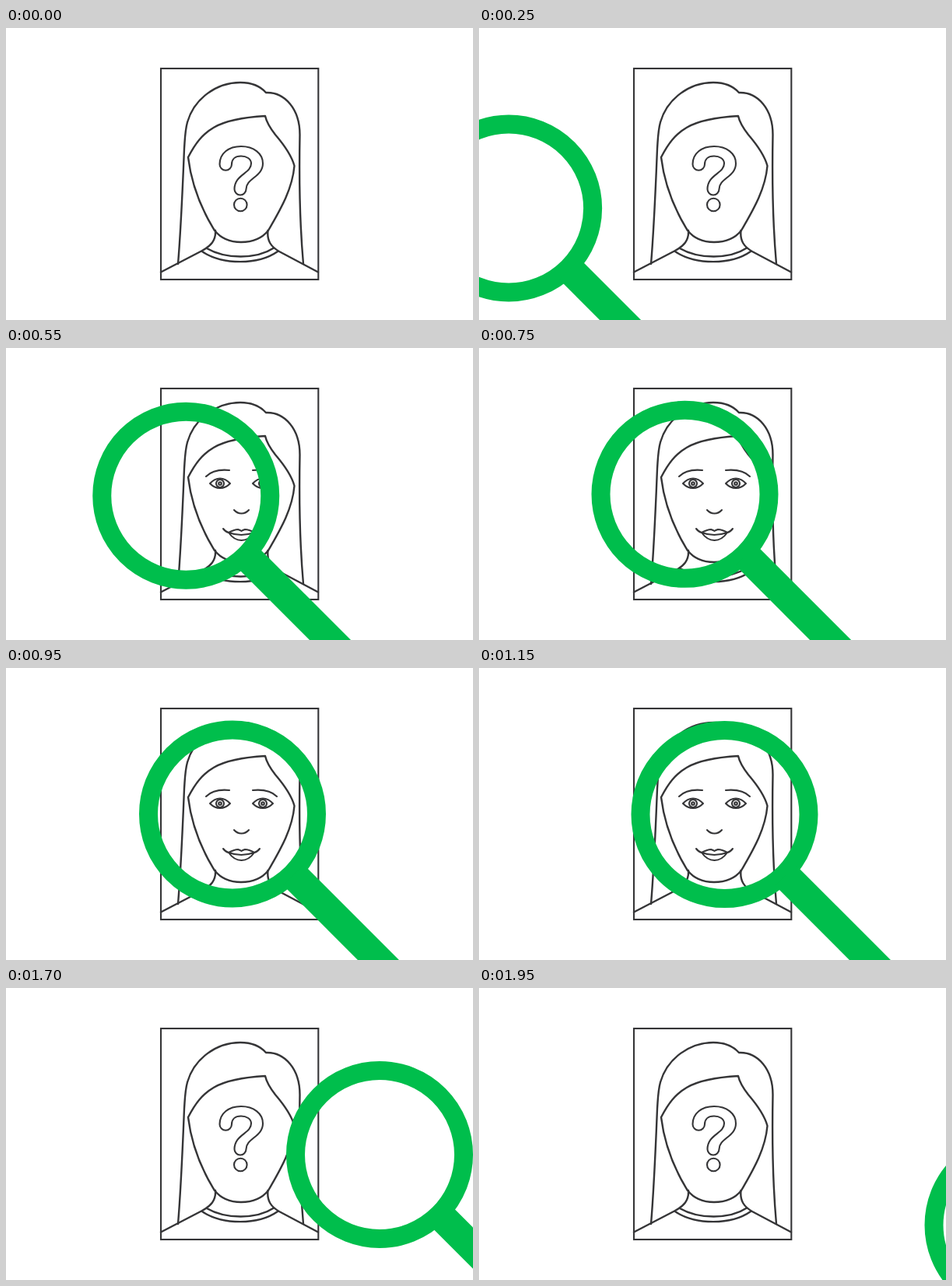
Write an HTML page that moves like this. It is 600 px wide and 375 px high and loops after 2 s.

```html
<!DOCTYPE html>
<html lang="en">
<head>
<meta charset="utf-8">
<title>Magnifier over a portrait</title>
<style>
  html, body { margin: 0; width: 100%; height: 100%; overflow: hidden; background: #fff; }
  svg { display: block; width: 600px; height: 375px; }
  .ink { fill: none; stroke: #353537; stroke-width: 2.1; stroke-linejoin: round; stroke-linecap: round; }
  .bold { stroke-width: 2.4; }
  .glass { fill: none; stroke: #00be4c; }
</style>
</head>
<body>
<svg viewBox="0 0 600 375">
  <defs>
    <clipPath id="lens"><circle class="follow" r="98"/></clipPath>
    <g id="eye">
      <path d="M-13 0Q-7 -6.5 0 -6.5T13 0Q7 6 0 6T-13 0Z"/>
      <circle r="5"/>
      <circle r="1.8"/>
    </g>
  </defs>

  <!-- question mark, blanked out where the lens covers it -->
  <g class="ink">
    <path d="M274.500 175C274.500 161 286 152 302 152C318 152 330 161 330 174C330 191 308.500 193 308.500 207A7.500 7.500 0 0 1 293.500 207C293.500 188 315 187 315 174C315 168 309 164.500 302 164.500C294 164.500 290 169 290 175A7.750 7.750 0 0 1 274.500 175Z"/>
    <circle cx="301.300" cy="227" r="8.300"/>
  </g>
  <circle class="follow" r="98" fill="#fff"/>

  <rect class="ink" x="199" y="52" width="202.300" height="271" style="stroke-linejoin: miter"/>
  <g class="ink bold">
    <!-- hair -->
    <path d="M221 303C225 255 227 205 229 155C230 140 230 132 233 121C242 90 271 70 301 70C315 70 327 75 334 83C358 82 377.500 104 377.500 137C376.500 190 377 247 382 303"/>
    <!-- fringe and jaw -->
    <path d="M234 166C252 131 271 116.500 333 113C335 122 339 128 346 137C358 151 367 164 370.500 177C368 206 354 231 337 260C329 270 316 275 302 275C288 275 276 270 268 260C250 231 238 199 234 166Z"/>
    <!-- neck, shoulders, collar -->
    <path d="M269 260C270 273 263 280 251 286.500L199 313.500M336.500 260C335 274 341 281 351 287L401 313.500"/>
    <path d="M258 283C282 297 322 297 344 282.500M252 287C278 304.500 324 304.500 349 287"/>
  </g>

  <g class="ink" clip-path="url(#lens)">
    <use href="#eye" x="275" y="174"/>
    <use href="#eye" x="330" y="174"/>
    <path d="M257 165Q267 155 287 157M348 165Q338 155 317 157"/>
    <path d="M293 208Q297 212.500 302.500 212.500T312 208"/>
    <path d="M279 232Q282 236 286 237Q294 233 298 233Q301 234 302.500 235Q304 234 307 233Q312 233 319 237Q323 236 326 232"/>
    <path d="M286 237Q302 243 319 237Q312 247 302.500 247T286 237"/>
  </g>

  <g id="magnifier" class="glass">
    <circle r="108" stroke-width="24"/>
    <path d="M78 78L500 500" stroke-width="37.500"/>
  </g>
</svg>
<script>
  const LOOP = 2000, STEP = 50, START = 100;

  // time in ms, x of the lens centre, speed in px per ms
  const keys = [
    [100, -92, 0.87],
    [400, 160, 0.76],
    [600, 242, 0.18],
    [750, 264.5, 0.135],
    [950, 291, 0.125],
    [1150, 315.5, 0.125],
    [1400, 351, 0.17],
    [1700, 480, 0.79],
    [1950, 692.5, 0.87]
  ];

  const magnifier = document.getElementById("magnifier");
  const followers = document.querySelectorAll(".follow");

  // cubic Hermite interpolation between neighbouring keys
  function lensX(t) {
    const i = Math.max(1, keys.findIndex(k => k[0] >= t));
    const [t0, x0, v0] = keys[i - 1], [t1, x1, v1] = keys[i];
    const d = t1 - t0, u = (t - t0) / d, w = 1 - u;
    return w * w * ((1 + 2 * u) * x0 + u * d * v0) +
           u * u * ((1 + 2 * w) * x1 - w * d * v1);
  }

  // the lens travels along a shallow arc
  const lensY = x => 187.5 + 0.000711 * (x - 287) ** 2;

  function draw(time) {
    const t = Math.floor((time % LOOP) / STEP) * STEP;
    const x = t < START ? -900 : lensX(t);
    const y = t < START ? 0 : lensY(x);
    magnifier.setAttribute("transform", `translate(${x} ${y})`);
    magnifier.style.display = t < START ? "none" : "";
    for (const c of followers) {
      c.setAttribute("cx", x);
      c.setAttribute("cy", y);
    }
  }

  const begin = performance.now();
  function tick() {
    draw(performance.now() - begin);
    requestAnimationFrame(tick);
  }
  tick();
</script>
</body>
</html>
```
